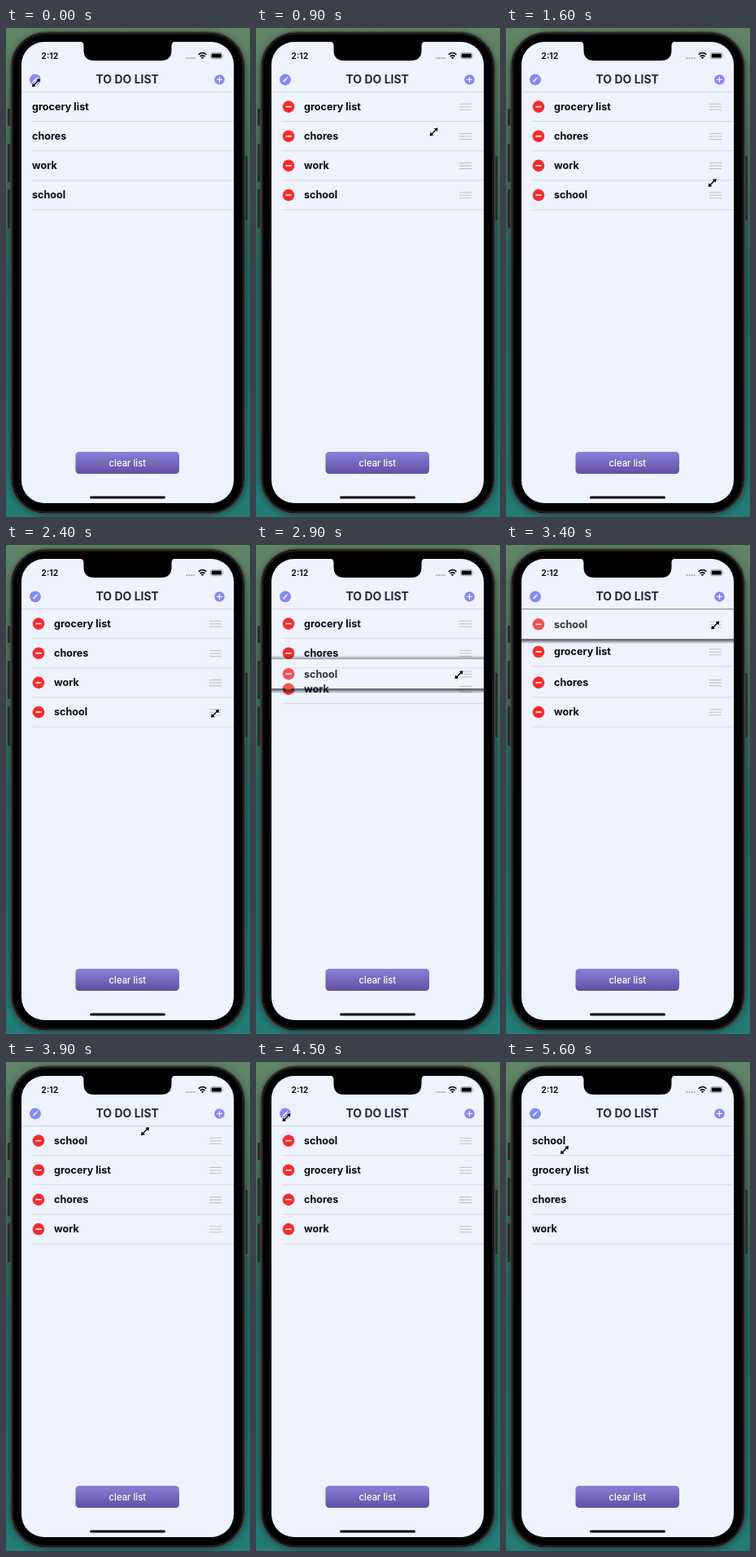
An HTML page that plays this animation: 300 by 600 pixels, repeating every 6000 ms.

```html
<!DOCTYPE html>
<html lang="en">
<head>
<meta charset="utf-8">
<title>To do list</title>
<style>
  html, body { margin: 0; width: 100%; height: 100%; overflow: hidden; background: #2b6a5c; }
  svg { display: block; width: 100vw; height: 100vh; }
  text { font-family: Inter, "Open Sans", sans-serif; }
  .item { font-size: 12.6px; font-weight: 700; fill: #08080c; }
  .rule { stroke: #d5d9e5; }
  .grip { stroke: #c0c3cd; stroke-width: 1.1; }
</style>
</head>
<body>
<svg viewBox="0 0 300 600">
  <defs>
    <linearGradient id="wall" x2="0" y2="1">
      <stop offset="0" stop-color="#628467"/>
      <stop offset=".25" stop-color="#4a735a"/>
      <stop offset=".5" stop-color="#246a60"/>
      <stop offset="1" stop-color="#247b76"/>
    </linearGradient>
    <linearGradient id="button" x2="0" y2="1">
      <stop offset="0" stop-color="#8a80d8"/>
      <stop offset="1" stop-color="#6150a4"/>
    </linearGradient>
    <linearGradient id="above" x2="0" y2="1">
      <stop offset="0" stop-opacity="0"/>
      <stop offset="1" stop-opacity=".38"/>
    </linearGradient>
    <linearGradient id="below" x2="0" y2="1">
      <stop offset="0" stop-opacity=".72"/>
      <stop offset=".4" stop-opacity=".4"/>
      <stop offset="1" stop-opacity="0"/>
    </linearGradient>
    <filter id="soft" x="-10%" y="-10%" width="120%" height="120%"><feGaussianBlur stdDeviation="4"/></filter>
    <clipPath id="listArea"><rect x="19" y="78" width="261" height="430"/></clipPath>
  </defs>

  <!-- phone -->
  <rect width="300" height="600" fill="url(#wall)"/>
  <rect x="6" y="7" width="288" height="590" rx="44" opacity=".5" filter="url(#soft)"/>
  <g fill="#2b2b2d">
    <rect x="2" y="99" width="5" height="21" rx="1"/>
    <rect x="2" y="142" width="5" height="47" rx="1"/>
    <rect x="2" y="198" width="5" height="48" rx="1"/>
    <rect x="292" y="157" width="5" height="79" rx="1"/>
  </g>
  <rect x="6" y="5" width="287.5" height="591" rx="43" fill="#000" stroke="#48484a" stroke-width="1.5"/>
  <rect x="8" y="7" width="283.5" height="587" rx="41" fill="none" stroke="#1d1d1f" stroke-width="2"/>
  <rect x="19" y="17" width="261" height="566" rx="28" fill="#eff3ff"/>
  <path d="M91 16.5Q95.500 17 95.500 22V27Q95.500 40 108.500 40H190.500Q203.500 40 203.500 27V22Q203.500 17 208 16.5Z"/>

  <!-- status bar -->
  <text x="43.300" y="37.800" font-size="10.600" font-weight="600">2:12</text>
  <g fill="#a5a8b3">
    <circle cx="222.500" cy="37" r="1.100"/><circle cx="225.500" cy="37" r="1.100"/>
    <circle cx="228.500" cy="37" r="1.100"/><circle cx="231.500" cy="37" r="1.100"/>
  </g>
  <g fill="none" stroke="#000" stroke-width="1.600">
    <path d="M236.800 32.700Q241.600 28.300 246.400 32.700M238.600 34.900Q241.600 32.200 244.600 34.900"/>
    <path d="M241.600 37.900L239.900 36.300Q241.600 34.900 243.300 36.300Z" fill="#000" stroke="none"/>
  </g>
  <rect x="251.500" y="30.300" width="14.500" height="7.400" rx="2.200" fill="none" stroke="#8c8e96" stroke-width=".8"/>
  <rect x="252.700" y="31.400" width="12.200" height="5.200" rx="1.300"/>
  <path d="M267 32.800q1.300 1.200 0 2.400z" fill="#8c8e96"/>

  <!-- header -->
  <text x="149.200" y="67.700" font-size="14" font-weight="700" fill="#292640" text-anchor="middle">TO DO LIST</text>
  <circle cx="36" cy="63.400" r="6.900" fill="#8288f8"/>
  <path d="M33.600 65.800L37.700 61.700M38.400 61L39 60.400" stroke="#fff" stroke-width="1.800"/>
  <circle cx="262.500" cy="63.400" r="6.200" fill="#8288f8"/>
  <path d="M259 63.400h7M262.500 59.900v7" stroke="#fff" stroke-width="1.200"/>
  <path class="rule" d="M19 78.500H280"/>

  <g id="list" clip-path="url(#listArea)"></g>

  <!-- footer -->
  <rect x="85.500" y="520" width="127.500" height="27" rx="4.500" fill="url(#button)"/>
  <text x="149.300" y="537.500" font-size="11.300" font-weight="500" fill="#fff" text-anchor="middle">clear list</text>
  <rect x="103" y="574.500" width="93" height="3" rx="1.500"/>

  <g id="cursor">
    <path id="arrow" d="M5 -5L4.300 -.2L2.700 -1.700L-1.700 2.700L-.2 4.300L-5 5L-4.300 .2L-2.700 1.700L1.700 -2.700L.2 -4.300Z"
      stroke="#fff" stroke-width="1.400" paint-order="stroke"/>
  </g>
</svg>
<script>
const LOOP = 6000, STEP = 100, TOP = 96.6, ROW = 36.15;
const get = id => document.getElementById(id);
const clamp = v => Math.max(0, Math.min(1, v));
const ease = (t, from, to) => { const p = clamp((t - from) / (to - from)); return p * p * (3 - 2 * p); };

// piecewise linear path through [time, ...values]
function along(keys, t) {
  let i = 0;
  while (i < keys.length - 2 && t >= keys[i + 1][0]) i++;
  const [a, b] = [keys[i], keys[i + 1]];
  const p = clamp((t - a[0]) / (b[0] - a[0]));
  return a.slice(1).map((v, k) => v + (b[k + 1] - v) * p);
}

const pointer = [
  [0, 37, 67.3], [500, 37, 67.3], [900, 218.5, 127.5], [1200, 249, 176], [1800, 256, 197],
  [1900, 256, 197], [2000, 257, 206.7], [2500, 257, 206.7], [2900, 249.5, 159.3],
  [3200, 255, 99], [3400, 257.3, 98.5], [3500, 257.3, 98.5], [3900, 171, 85],
  [4500, 37.5, 68], [5100, 37.5, 68], [5600, 72, 108]
];
const drag = [[2500, TOP + 3 * ROW], [2900, 158.2], [3200, 98], [3400, 97.3], [3600, TOP]];

// moves: when each remaining row slides down one place
const rows = [
  { name: "grocery list", moves: 3140 },
  { name: "chores", moves: 2970 },
  { name: "work", moves: 2810 },
  { name: "school" }
];

get("list").innerHTML = rows.map(({ name, moves }) => `<g>
  ${moves ? "" : `<g class="lift">
    <rect x="19" y="-23" width="261" height="5" fill="url(#above)"/>
    <rect x="19" y="-18" width="261" height="36" fill="#eff3ff" opacity=".2"/>
    <rect x="19" y="18" width="261" height="6" fill="url(#below)"/></g>`}
  <path class="rule" d="M32 18H280"/>
  <g class="body">
    <g class="minus"><circle cx="40" r="7.300" fill="#fb2a2c"/><path d="M36.400 0h7.200" stroke="#fff" stroke-width="1.600"/></g>
    <text class="item" y="4.300">${name}</text>
    <path class="grip" d="M250 -3.300h15M250 .2h15M250 3.700h15"/>
  </g></g>`).join("");
rows.forEach((row, i) => {
  row.el = get("list").children[i];
  for (const c of ["lift", "rule", "body", "minus", "item", "grip"]) row[c] = row.el.querySelector("." + c);
});

function draw(t) {
  const edit = ease(t, 200, 400) - ease(t, 4900, 5100);
  const lift = ease(t, 2500, 2700) - ease(t, 3400, 3600);
  rows.forEach((row, i) => {
    const y = row.moves ? TOP + ROW * (i + ease(t, row.moves, row.moves + 300)) : along(drag, t)[0];
    row.el.setAttribute("transform", `translate(0 ${y})`);
    row.item.setAttribute("x", 32 + 27 * edit);
    row.minus.setAttribute("transform", `translate(${-27 * (1 - edit)} 0)`);
    row.minus.setAttribute("opacity", edit);
    row.grip.setAttribute("opacity", edit);
    if (row.lift) {
      row.lift.setAttribute("opacity", lift);
      row.rule.setAttribute("opacity", 1 - lift);
      row.body.setAttribute("opacity", 1 - .18 * lift);
    }
  });
  get("cursor").setAttribute("transform", `translate(${along(pointer, t)})`);
}

const start = performance.now();
function tick() {
  const t = (performance.now() - start) % LOOP;
  draw(Math.floor(t / STEP) * STEP);
  requestAnimationFrame(tick);
}
tick();
</script>
</body>
</html>
```
